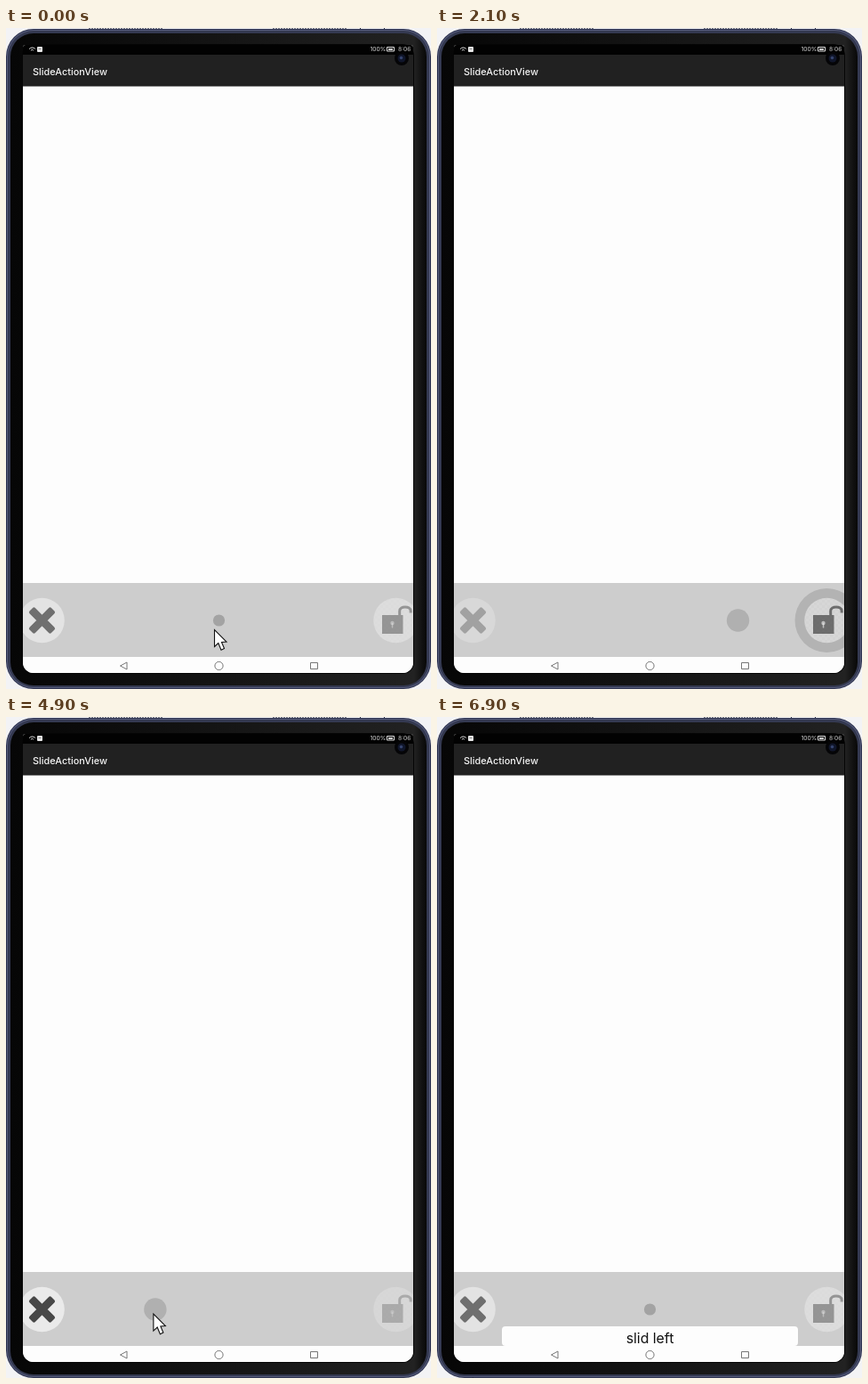
Write an HTML page with a canvas that moves like this. It is 478 by 742 pixels and loops after 7 s.

```html
<!DOCTYPE html>
<html lang="en">
<head>
<meta charset="utf-8">
<title>SlideActionView</title>
<style>
html, body { margin: 0; width: 100%; height: 100%; overflow: hidden; background: #f3f3f5; }
canvas { display: block; }
</style>
</head>
<body>
<canvas id="stage" width="478" height="742"></canvas>
<script>
const ctx = document.getElementById('stage').getContext('2d');
const LOOP = 7000, STEP = 100;
const SCREEN = { x: 19, y: 19, w: 439, h: 705 };
const TRAVEL = 198, MID = 239.5, ROW = 665, BUTTON = 25.3;
const LEFT = MID - TRAVEL - 1, RIGHT = MID + TRAVEL + 1;
const FONT = 'Inter, "Open Sans", sans-serif';

const span = (t, from, to) => Math.min(1, Math.max(0, (t - from) / (to - from)));
const mix = (a, b, k) => a + (b - a) * k;
const easeOut = k => 1 - (1 - k) ** 3;

function rect(x, y, w, h, fill) {
  ctx.fillStyle = fill;
  ctx.fillRect(x, y, w, h);
}

// A row across the full width of the screen
function band(top, bottom, fill) {
  rect(SCREEN.x, top, SCREEN.w, bottom - top, fill);
}

function roundRect(x, y, w, h, r, fill) {
  ctx.beginPath();
  ctx.roundRect(x, y, w, h, r);
  ctx.fillStyle = fill;
  ctx.fill();
}

function disc(x, y, r, fill) {
  ctx.beginPath();
  ctx.arc(x, y, r, 0, Math.PI * 2);
  ctx.fillStyle = fill;
  ctx.fill();
}

function stroke(color, width) {
  ctx.strokeStyle = color;
  ctx.lineWidth = width;
  ctx.stroke();
}

function text(str, x, y, font, fill, align = 'left') {
  ctx.font = `${font} ${FONT}`;
  ctx.textAlign = align;
  ctx.fillStyle = fill;
  ctx.fillText(str, x, y);
}

function cursorAt(t) {
  if (t < 1000) return [234, mix(675, 668, span(t, 0, 200))];
  if (t < 1700) {
    const out = Math.sin(Math.PI * span(t, 930, 1500));
    const lift = Math.sin(Math.PI * span(t, 1000, 1500));
    return [234 + 229 * out, 671 - 22 * lift];
  }
  if (t < 2700) return null;
  if (t < 3000) return [437, 666];
  if (t < 3300) return null;
  if (t < 4500) {
    const k = span(t, 3300, 4000);
    return [mix(322, 237, k), mix(680, 671, k)];
  }
  const k = span(t, 4500, 5600);
  return [mix(237, 40, k), mix(671, 667, k) + 75 * span(t, 6600, 6900)];
}

// Signed drag amount: -1 is fully left, 1 is fully right
function dragAt(t) {
  if (t >= 1700 && t < 2700) return 0.5 * easeOut(span(t, 1600, 2100));
  if (t >= 2700 && t < 2800) return 1;
  if (t >= 4600 && t < 5400) return (cursorAt(t)[0] - 237) / TRAVEL;
  if (t >= 5400 && t < 6000) return -1;
  return 0;
}

function drawDevice() {
  rect(0, 0, 478, 742, '#f3f3f5');
  for (const x of [93, 300])
    for (let i = 0; i < 84; i += 3) rect(x + i, 0, 2, 1, '#777a88');
  for (const x of [398, 425]) rect(x, 0, 1, 2, '#252a44');
  ['#2d324e', '#555b7b', '#343951'].forEach((color, i) =>
    roundRect(i, 1 + i, 478 - 2 * i, 741 - 2 * i, 31 - i, color));
  const shade = ctx.createLinearGradient(5, 0, 473, 0);
  shade.addColorStop(0, '#060606');
  shade.addColorStop(0.97, '#222');
  shade.addColorStop(1, '#080808');
  roundRect(5, 6, 468, 732, 26, shade);
  roundRect(18, 18, 441, 707, 13, '#050505');
}

function drawStatus() {
  band(19, 30, '#020202');
  band(30, 65, '#212121');
  band(65, 66, '#8a8a8a');
  for (const r of [2, 4.5]) {
    ctx.beginPath();
    ctx.arc(29.5, 26.5, r, -Math.PI * 0.78, -Math.PI * 0.22);
    stroke('#ddd', 1);
  }
  roundRect(35, 21, 6, 6, 1, '#e6e6e6');
  rect(36.5, 23, 3, 1, '#888');
  text('100%', 409.5, 26.3, '6.7px', '#ddd');
  ctx.beginPath();
  ctx.rect(428.5, 21.5, 8, 4.5);
  stroke('#ddd', 1);
  rect(430, 23, 5, 1.8, '#ddd');
  text('8:06', 441, 26.3, '6.7px', '#ccc');
  disc(445, 34, 8, '#050507');
  disc(445, 34, 4.5, '#10162b');
  disc(444.5, 33.5, 1.8, '#35436d');
  text('SlideActionView', 30, 52.6, '500 10.9px', '#f4f4f4');
}

function drawNav() {
  band(706, 724, '#fdfdfd');
  ctx.beginPath();
  ctx.moveTo(128.5, 716);
  ctx.lineTo(136, 712);
  ctx.lineTo(136, 720);
  ctx.closePath();
  ctx.moveTo(MID + 4.6, 716);
  ctx.arc(MID, 716, 4.6, 0, Math.PI * 2);
  ctx.rect(342.5, 712.5, 8, 7);
  stroke('#777', 1);
}

function drawCross(a) {
  disc(LEFT, ROW, BUTTON, `rgba(255,255,255,${0.85 * a})`);
  ctx.save();
  ctx.translate(LEFT, ROW);
  ctx.rotate(Math.PI / 4);
  const half = 17.3, w = 4.5;
  ctx.beginPath();
  ctx.roundRect(-half, -w, half * 2, w * 2, 2);
  ctx.roundRect(-w, -half, w * 2, half * 2, 2);
  ctx.fillStyle = `rgba(10,10,10,${Math.min(1, 1.06 * a)})`;
  ctx.fill();
  ctx.restore();
}

function drawLock(a) {
  ctx.save();
  ctx.globalAlpha = a;
  disc(RIGHT, ROW, BUTTON, 'rgba(255,255,255,0.62)');
  ctx.clip();
  for (let i = 0; i < 18; i++)
    for (let j = i % 2; j < 18; j += 2) rect(412 + i * 3, 639 + j * 3, 3, 3, 'rgba(190,190,190,0.2)');
  ctx.globalAlpha = 0.9 * a;
  ctx.beginPath();
  ctx.moveTo(442.7, 659);
  ctx.lineTo(442.7, 654.5);
  ctx.bezierCurveTo(442.7, 648.5, 455.2, 648.5, 455.2, 654.5);
  ctx.lineTo(455.2, 656.5);
  stroke('#3c3c3c', 3);
  rect(423, 659, 23.5, 21, '#3c3c3c');
  disc(434.5, 668, 2.2, '#e8e8e8');
  rect(433.8, 668, 1.5, 5.5, '#e8e8e8');
  ctx.restore();
}

function drawSlider(t) {
  const p = dragAt(t);
  band(623, 706, '#cdcdcd');
  if (p > 0 && p < 1) disc(RIGHT, ROW, 26 + 20 * p, '#b3b3b3');
  drawCross((1 - p) / 2);
  drawLock((1 + p) / 2);
  if (Math.abs(p) === 1) return;
  const pressed = p !== 0 || (t >= 1500 && t < 1700);
  disc(MID + p * TRAVEL, ROW, pressed ? 12.7 : 6.6, pressed ? '#b0b0b0' : '#a3a3a3');
}

function drawToast(label, alpha) {
  ctx.globalAlpha = alpha;
  roundRect(73, 684, 333, 22, 4, '#fdfdfd');
  text(label, MID, 702.5, '15.8px', '#111', 'center');
  ctx.globalAlpha = 1;
}

function drawCursor([x, y]) {
  ctx.save();
  ctx.translate(x + 0.5, y + 0.5);
  ctx.beginPath();
  ctx.moveTo(0, 0);
  ctx.lineTo(0, 19);
  ctx.lineTo(4.3, 15);
  ctx.lineTo(7.5, 22.7);
  ctx.lineTo(11, 21);
  ctx.lineTo(8, 14);
  ctx.lineTo(13.5, 13.5);
  ctx.closePath();
  ctx.fillStyle = '#fff';
  ctx.fill();
  stroke('#111', 1.1);
  ctx.restore();
}

function draw(t) {
  drawDevice();
  ctx.save();
  ctx.beginPath();
  ctx.roundRect(SCREEN.x, SCREEN.y, SCREEN.w, SCREEN.h, [3, 3, 12, 12]);
  ctx.clip();
  band(19, 724, '#fdfdfd');
  drawStatus();
  drawSlider(t);
  drawNav();
  if (t >= 2800 && t < 3800) drawToast('slid right', 1 - span(t, 3500, 3800));
  if (t >= 6000) drawToast('slid left', span(t, 5900, 6100));
  ctx.restore();
  const cursor = cursorAt(t);
  if (cursor) drawCursor(cursor);
}

const start = performance.now();
function tick() {
  const t = (performance.now() - start) % LOOP;
  draw(Math.floor(t / STEP) * STEP);
  requestAnimationFrame(tick);
}
tick();
</script>
</body>
</html>
```
